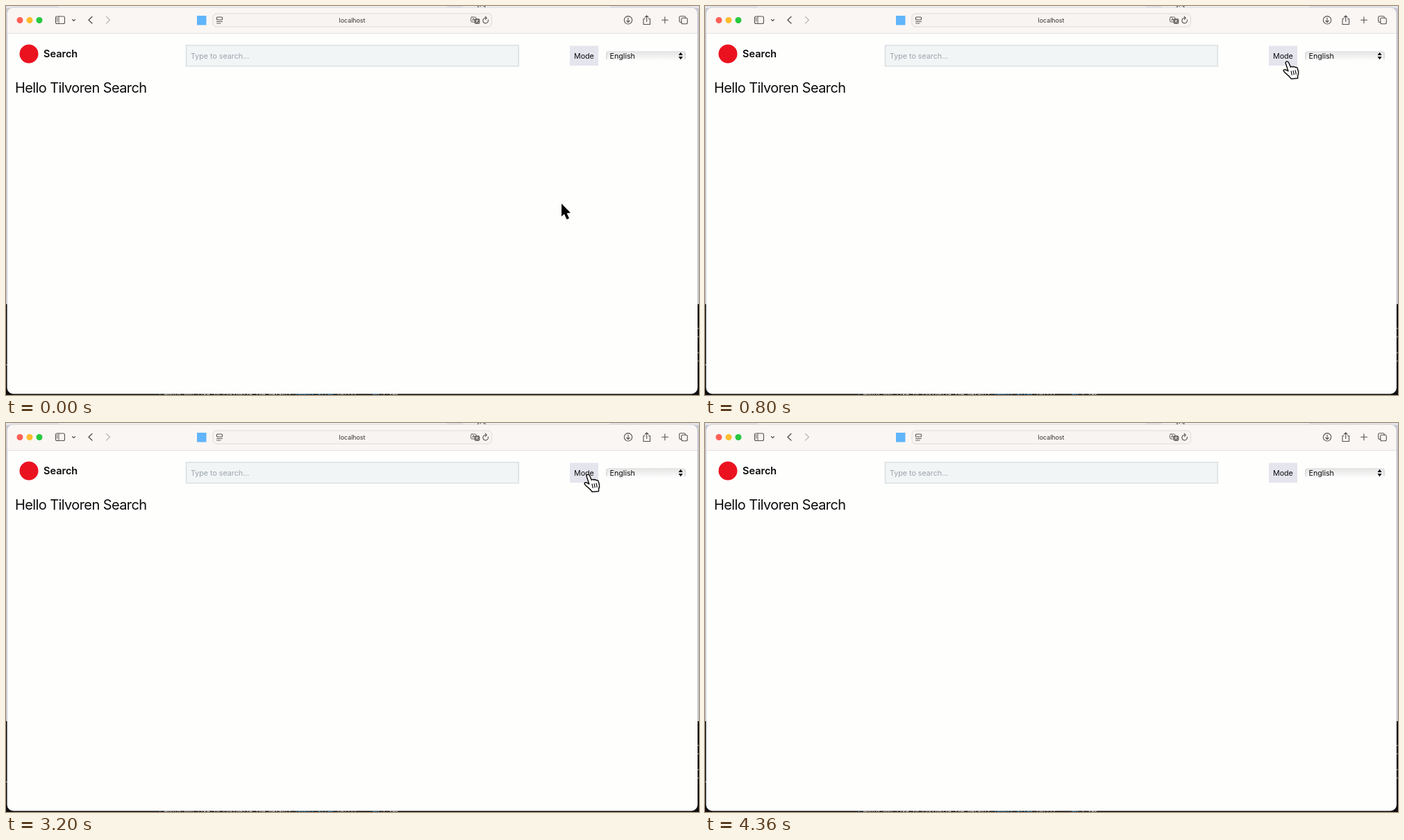
An HTML page that plays this animation: 998x561 px, repeating every 5.9 s.

```html
<!DOCTYPE html>
<html lang="en">
<head>
<meta charset="utf-8">
<title>Theme switch</title>
<style>
  html, body { margin: 0; width: 100%; height: 100%; overflow: hidden; }
  svg { display: block; width: 100%; height: 100%; font-family: Inter, "Noto Sans", sans-serif; font-size: 10.7px;
    --page: #fefefd; --ink: #0b0b0c; --brand: #0b0b0c; --field: #f1f5f5; --edge: #d9dfe2;
    --hint: #9ca3af; --button: #e5e5ee; --shade: #e3e3e4; --side: #c9c9cb; }
  svg.dark { --page: #1e1e1d; --ink: #f8f8f8; --brand: #1d1d28; --field: #354156; --edge: #f2f2f2;
    --hint: #a3abb9; --button: #1d273a; --shade: #2b2b2b; --side: #0c0c0c; }
  .page { fill: var(--page); }
  .ink { fill: var(--ink); }
  .icon { fill: none; stroke: #555250; stroke-width: 1.1; stroke-linecap: round; stroke-linejoin: round; }
  .terminal { font: 7.8px "DejaVu Sans Mono", "Liberation Mono", monospace; fill: #ddd; white-space: pre; }
  .blue { fill: #3ba5e0; }
</style>
</head>
<body>
<svg id="stage" viewBox="0 0 998 561" preserveAspectRatio="none">
  <defs>
    <clipPath id="window"><rect x="1.5" y="2" width="994.5" height="557.5" rx="9"/></clipPath>
    <linearGradient id="select" x2="0" y2="1">
      <stop style="stop-color:var(--shade)"/>
      <stop offset="1" style="stop-color:var(--page)"/>
    </linearGradient>
  </defs>

  <!-- desktop behind the browser -->
  <rect width="998" height="561" fill="#c9cad5"/>
  <rect width="998" height="3" fill="#e3e6ed"/>
  <path d="M76 0H635V3H76ZM658 0H870V3H658Z" fill="#f4f5f7"/>
  <text x="672" y="2" font-size="11" style="font-family:'Noto Sans CJK KR','Noto Sans CJK',sans-serif">목차</text>
  <rect y="430" width="998" height="131" fill="#101011"/>
  <path d="M0 517.5H2M996 465H998M996 477H998M996 500H998M996 512H998" stroke="#bbb"/>
  <g class="terminal">
    <text x="219" y="563" class="blue">?</text>
    <text x="228" y="563">Would you like to customize the default <tspan class="blue">import alias</tspan> (@/*)?</text>
    <text x="528" y="563"><tspan class="blue">No</tspan> / Yes</text>
  </g>

  <g clip-path="url(#window)">
    <rect class="page" y="2" width="998" height="559"/>
    <rect y="2" width="998" height="37" fill="#faf6f4"/>
    <rect y="39" width="998" height="1" fill="#e6e3e1" id="divider"/>
  </g>
  <rect x="1.5" y="2" width="994.5" height="557.5" rx="9" fill="none" stroke="#000" stroke-opacity=".16" stroke-width=".8"/>

  <!-- browser toolbar -->
  <circle cx="20" cy="20.5" r="4.5" fill="#fe5f57"/>
  <circle cx="34" cy="20.5" r="4.5" fill="#febc2e"/>
  <circle cx="48" cy="20.5" r="4.5" fill="#28c840"/>
  <rect x="275" y="14" width="13.5" height="13.5" fill="#61b5fa"/>
  <rect x="298" y="11" width="401.5" height="19" rx="5" fill="#f8f4f2" stroke="#dfdbd9"/>
  <text x="498.5" y="24" text-anchor="middle" font-size="8.9" fill="#333130">localhost</text>
  <g class="icon">
    <rect x="71.5" y="15" width="13" height="10.5" rx="2"/>
    <path d="M76 15V25.5M73 17.5H74.5M73 19.5H74.5M73 21.5H74.5" stroke-width=".9"/>
    <path d="M95.5 19.5L97.5 21.5L99.5 19.5"/>
    <path d="M124 15.5L119 20.3L124 25.1" stroke-width="1.4"/>
    <path d="M144.500 15.500L149.500 20.300L144.500 25.100" stroke="#bbb7b5" stroke-width="1.3"/>
    <rect x="303.500" y="16" width="8" height="4" rx="1"/>
    <path d="M303.500 22.500H311.500M303.500 25H309" stroke-width=".9"/>
    <rect x="669.500" y="16" width="7.500" height="7" rx="1.500" stroke-width=".9"/>
    <path d="M671.500 21L673.200 17.500L675 21M672 20H674.500" stroke-width=".8"/>
    <rect x="675" y="18.500" width="7" height="7" rx="1.500" fill="#666361" stroke-width=".6"/>
    <path d="M676.500 21H680.500M678.500 20V21Q678.500 23 676.500 24M677.500 22L680.500 24" stroke="#faf6f4" stroke-width=".7"/>
    <path d="M694.300 20A3.800 3.800 0 1 1 690.500 17.300H692M690.200 15.200L692.300 17.300L690.200 19.300"/>
    <circle cx="896" cy="20.300" r="5.700"/>
    <path d="M896 17V23.300M893.700 21.200L896 23.500L898.300 21.200"/>
    <path d="M920 18.500H918V26.500H927.500V18.500H925.500M922.700 22.500V14M920.200 16.300L922.700 13.800L925.200 16.300"/>
    <path d="M944.500 20.300H953.500M948.900 15.800V24.800"/>
    <rect x="972.700" y="17.300" width="8.600" height="8.400" rx="2"/>
    <path d="M972.700 23.500H971.500Q969.700 23.500 969.700 21.500V16.500Q969.700 14.700 971.500 14.700H976.500Q978.300 14.700 978.300 16.500V17.300"/>
  </g>

  <!-- page -->
  <circle cx="33" cy="69" r="13.500" fill="#eb1220"/>
  <text x="54" y="74" font-size="14.500" font-weight="600" style="fill:var(--brand)">Search</text>
  <rect x="259.500" y="56.700" width="478.800" height="30" stroke-width="1.500" style="fill:var(--field);stroke:var(--edge)"/>
  <text x="266" y="76" style="fill:var(--hint)">Type to search...</text>
  <rect x="812" y="57.500" width="41" height="28.500" style="fill:var(--button)"/>
  <text class="ink" x="818" y="76">Mode</text>
  <rect x="864.500" y="65" width="114" height="14" rx="3" fill="url(#select)"/>
  <path d="M865 67V77M978 67V77" style="stroke:var(--side)"/>
  <text class="ink" x="869.500" y="76">English</text>
  <path class="ink" d="M968.500 71L971.600 66.800L974.700 71ZM968.500 73L971.600 77.200L974.700 73Z"/>
  <text class="ink" x="13" y="125" font-size="20" letter-spacing="-.6">Hello Tilvoren Search</text>

  <g id="cursor" stroke-linejoin="round">
    <path id="arrow" d="M0 0V18.500L4 15L7.500 22.700L11 21.200L7.600 13.700L13 13.200Z" stroke="#fff" stroke-width="1.600" paint-order="stroke"/>
    <g id="hand" stroke="#111" stroke-width="1.500" stroke-linecap="round">
      <path fill="#fff" d="M-2 2.500Q-1.800 0 .3 .3Q2 .4 3 3L5.300 8.300Q7 6.500 8.700 8.200Q10.700 6.700 12 8.800Q14.200 7.500 15.200 10.500L16.500 15Q17 18.500 15.500 21L15.500 24.500L6.200 25.300Q3 21 -.5 18.300Q-5 14.800 -5 13Q-3.500 10.700 0 13L1.800 14Z"/>
      <path fill="none" stroke-width="1.200" d="M6 14L7.200 19.500M9 13.500L10.200 19M12 13L13.200 18.500"/>
    </g>
  </g>
</svg>
<script>
  const LOOP = 5900, FRAME = 1000 / 30;
  const byId = id => document.getElementById(id);
  const [stage, divider, cursor, arrow, hand] = ["stage", "divider", "cursor", "arrow", "hand"].map(byId);

  const linear = p => p;
  const smooth = p => p * p * (3 - 2 * p);
  const easeOut = p => 1 - (1 - p) ** 2;

  // [video frame, x, y, easing towards this point]
  const path = [
    [0, 800, 285], [5, 765, 279, easeOut], [8, 765, 279], [20, 828, 105, smooth], [21, 828, 105],
    [26, 840, 75, easeOut], [27, 840, 75], [29, 838, 74], [117, 838, 74], [118, 840, 66],
    [124, 785, 30], [130, 684, 1]
  ];

  function cursorAt(frame) {
    const next = path.findIndex(point => point[0] >= frame);
    if (next < 0) return null;
    const [endFrame, x, y, ease = linear] = path[next];
    const [startFrame, x0, y0] = path[Math.max(0, next - 1)];
    const p = ease((frame - startFrame) / (endFrame - startFrame || 1));
    return { x: x0 + (x - x0) * p, y: y0 + (y - y0) * p };
  }

  function draw(now) {
    const time = now % LOOP;
    const dark = time >= 1230 && time < 3200;
    stage.classList.toggle("dark", dark);
    divider.style.display = dark ? "none" : "";

    const point = cursorAt(Math.floor((time + 7) / FRAME));
    cursor.style.display = point ? "" : "none";
    if (point) {
      const { x, y } = point;
      const overButton = x > 812 && x < 853 && y > 57 && y < 86;
      cursor.setAttribute("transform", `translate(${x} ${y})`);
      hand.style.display = overButton ? "" : "none";
      arrow.style.display = overButton ? "none" : "";
    }
  }

  const start = performance.now();
  function tick() {
    draw(performance.now() - start);
    requestAnimationFrame(tick);
  }
  tick();
</script>
</body>
</html>
```
